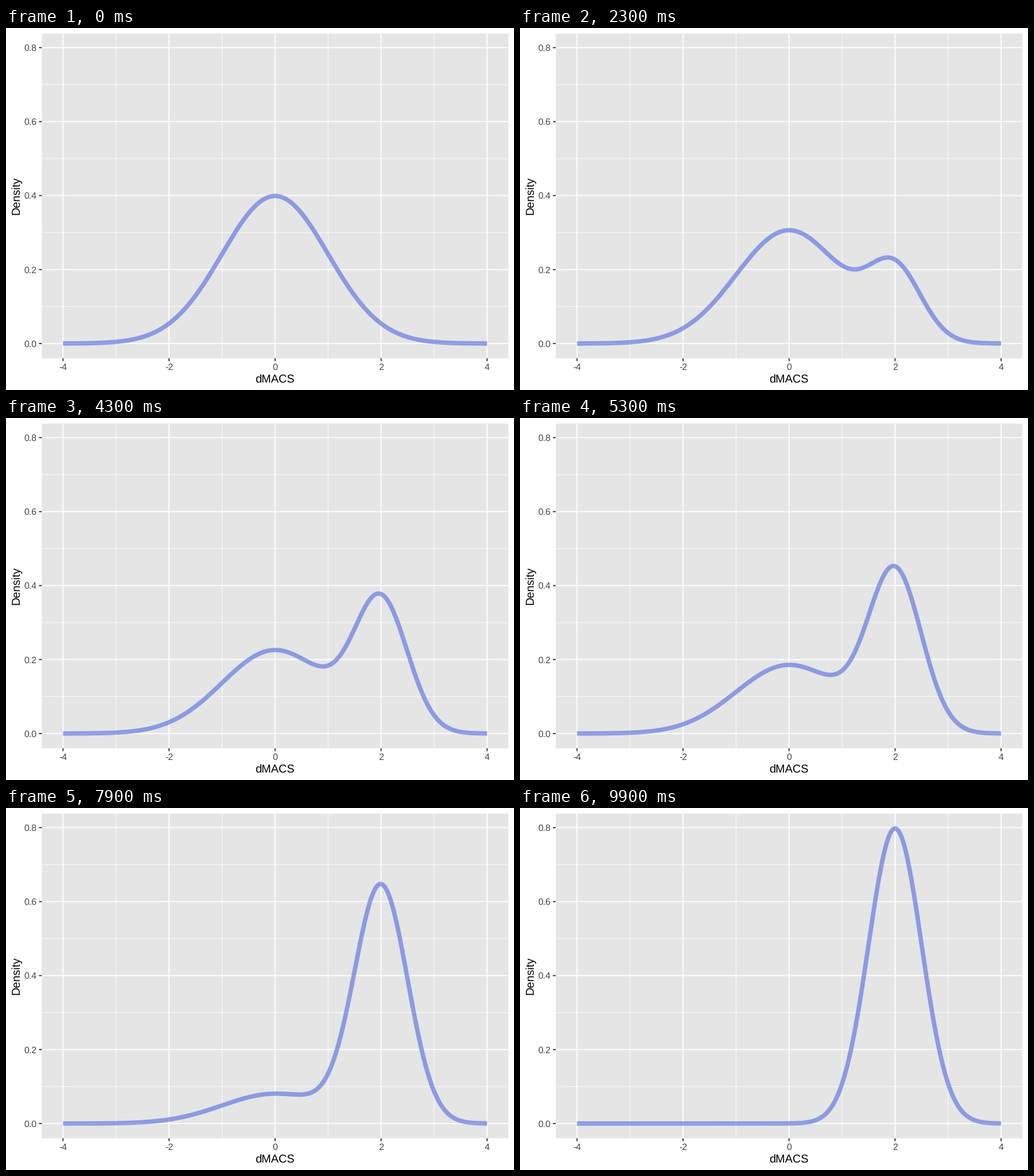
A matplotlib script that plays this animation: 885 px wide and 632 px high, repeating every 10 s.

```python
import numpy as np
import matplotlib.pyplot as plt
from matplotlib.animation import FuncAnimation
from matplotlib.patches import Rectangle

W, H, DPI = 885, 632, 100
FRAMES, INTERVAL = 100, 100
PT = 72 / DPI  # points per pixel

LEFT, RIGHT, TOP, BOTTOM = 62.4, 875.1, 9.9, 576.6
PANEL, TICK, LABEL = "#E5E5E5", "#333333", "#444444"
CURVE = (81 / 255, 104 / 255, 221 / 255)

plt.rcParams["font.family"] = "Liberation Sans"
plt.rcParams["text.hinting"] = "none"

fig = plt.figure(figsize=(W / DPI, H / DPI), dpi=DPI, facecolor="white")
ax = fig.add_axes([0, 0, 1, 1])
ax.set_xlim(0, W)
ax.set_ylim(H, 0)
ax.axis("off")


def normal(x, mean, sd):
    return np.exp(-((x - mean) / sd) ** 2 / 2) / (sd * np.sqrt(2 * np.pi))


PEAK = normal(2, 2, 0.5)


def px(x):
    return LEFT + (x + 4.4) / 8.8 * (RIGHT - LEFT)


def py(y):
    return BOTTOM - (y / PEAK + 0.05) / 1.1 * (BOTTOM - TOP)


def segment(x0, y0, x1, y1, color, width, z):
    ax.plot([x0, x1], [y0, y1], color=color, lw=width * PT, zorder=z,
            solid_capstyle="butt", snap=False)


def label(x, y, text, size, color, **kw):
    ax.text(x, y, text, fontsize=size * PT, color=color, va="baseline", **kw)


def grid(xs, ys, width, z):
    for x in xs:
        segment(px(x), TOP, px(x), BOTTOM, "white", width, z)
    for y in ys:
        segment(LEFT, py(y), RIGHT, py(y), "white", width, z)


x_ticks = (-4, -2, 0, 2, 4)
y_ticks = (0, 0.2, 0.4, 0.6, 0.8)

ax.add_patch(Rectangle((LEFT, TOP), RIGHT - LEFT, BOTTOM - TOP,
                       fc=PANEL, ec="none", zorder=0, snap=False))
grid((-3, -1, 1, 3), (0.1, 0.3, 0.5, 0.7), 0.97, 1)
grid(x_ticks, y_ticks, 1.93, 2)

for x in x_ticks:
    segment(px(x), BOTTOM, px(x), BOTTOM + 5, TICK, 1.93, 3)
    label(px(x), 596.8, str(x), 15.9, LABEL, ha="center")
for y in y_ticks:
    segment(LEFT - 5, py(y), LEFT, py(y), TICK, 1.93, 3)
    label(53.5, py(y) + 5.7, f"{y:.1f}", 15.9, LABEL, ha="right")

label((LEFT + RIGHT) / 2, 618.7, "dMACS", 19.9, "black", ha="center")
ax.text(23.6, (TOP + BOTTOM) / 2, "Density", fontsize=19.9 * PT,
        color="black", rotation=90, rotation_mode="anchor",
        ha="center", va="baseline")

grid_x = np.linspace(-4, 4, 401)
curve, = ax.plot([], [], color=CURVE, alpha=0.6, lw=7.7 * PT, zorder=4,
                 solid_capstyle="butt", solid_joinstyle="round", snap=False)


def update(i):
    w = i / (FRAMES - 1)
    density = (1 - w) * normal(grid_x, 0, 1) + w * normal(grid_x, 2, 0.5)
    curve.set_data(px(grid_x), py(density))
    return curve,


anim = FuncAnimation(fig, update, frames=FRAMES, interval=INTERVAL,
                     repeat=True, repeat_delay=0, blit=False)
plt.show()
```
